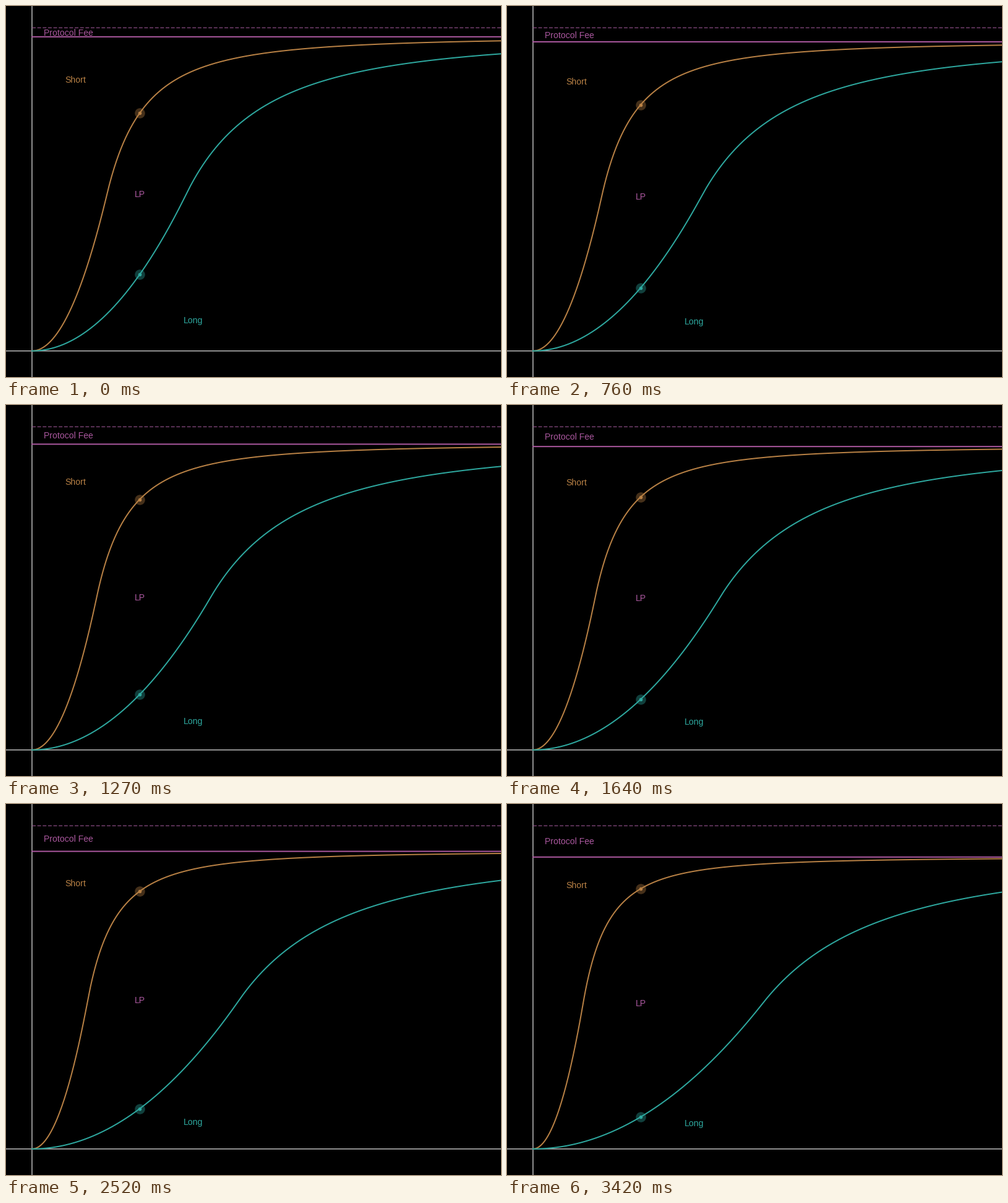
Animation, 800 px wide and 600 px high, one loop 3450 ms. Source, as a matplotlib script:

```python
import numpy as np
import matplotlib.pyplot as plt
from matplotlib.animation import FuncAnimation

W, H, DPI = 800, 600, 100
PX = 72 / DPI                       # points per pixel
FRAMES, INTERVAL = 115, 30

ORIGIN_X, ORIGIN_Y = 42, 557.8
CAP_Y = 35.2                        # dashed upper limit
DOT_X = 216
ORANGE, TEAL, PURPLE, GREY = "#b88145", "#2ea89f", "#ab589f", "#a9a9a9"

plt.rcParams["font.family"] = "Liberation Sans"
fig = plt.figure(figsize=(W / DPI, H / DPI), dpi=DPI, facecolor="black")
ax = fig.add_axes([0, 0, 1, 1])
ax.set_xlim(0, W)
ax.set_ylim(H, 0)
ax.axis("off")


def line(xs, ys, color, width, z=2, **kw):
    return ax.plot(xs, ys, color=color, lw=width * PX, zorder=z,
                   snap=False, **kw)[0]


def label(x, text, color):
    return ax.text(x, 0, text, color=color, fontsize=14 * PX,
                   ha="center", va="baseline", zorder=5)


def dot(color):
    """A bright core inside a translucent halo."""
    style = dict(marker="o", ls="", color=color, mew=0, zorder=4)
    halo = ax.plot([DOT_X], [0], ms=16.5 * PX, alpha=0.38, **style)[0]
    core = ax.plot([DOT_X], [0], ms=5.6 * PX, **style)[0]
    return halo, core


line([0, W], [ORIGIN_Y] * 2, GREY, 1.7, z=1)
line([ORIGIN_X] * 2, [0, H], GREY, 1.7, z=1)
line([ORIGIN_X, W], [CAP_Y] * 2, "#91508a", 1.2,
     dashes=(5, 2.2), dash_capstyle="butt")

xs = np.linspace(ORIGIN_X, W + 5, 600)
reserve_line = line([ORIGIN_X, W], [0, 0], PURPLE, 2)
short_line = line(xs, xs, ORANGE, 2)
long_line = line(xs, xs, TEAL, 2)
short_dot, long_dot = dot(ORANGE), dot(TEAL)

fee_label = label(101, "Protocol Fee", PURPLE)
short_label = label(112, "Short", ORANGE)
lp_label = label(216, "LP", PURPLE)
long_label = label(303, "Long", TEAL)


def payoff(x, reserve, coef):
    """Quadratic up to half the reserve, then approaching it asymptotically."""
    power = coef * (x - ORIGIN_X) ** 2
    tail = reserve - reserve ** 2 / (4 * np.maximum(power, 1e-9))
    return ORIGIN_Y - np.where(power <= reserve / 2, power, tail)


def draw(i):
    t = i * INTERVAL
    reserve = 508 * np.exp(-2.149e-5 * t)
    top = ORIGIN_Y - reserve
    sunk = 508 - reserve

    reserve_line.set_ydata([top, top])
    sides = ((short_line, short_dot, 0.01725 * np.exp(2.14e-4 * t)),
             (long_line, long_dot, 0.00408 * np.exp(-2.547e-4 * t)))
    for curve, marks, coef in sides:
        curve.set_ydata(payoff(xs, reserve, coef))
        for mark in marks:
            mark.set_ydata([payoff(DOT_X, reserve, coef)])

    centres = ((fee_label, (CAP_Y + top) / 2),
               (short_label, 119 + sunk / 3),
               (lp_label, (top + ORIGIN_Y) / 2),
               (long_label, 508.5 + sunk / 5))
    for text, y in centres:
        text.set_y(y + 5)
    return (reserve_line, short_line, long_line, *short_dot, *long_dot,
            fee_label, short_label, lp_label, long_label)


anim = FuncAnimation(fig, draw, frames=FRAMES, interval=INTERVAL,
                     repeat=True, repeat_delay=0, blit=False)
plt.show()
```
